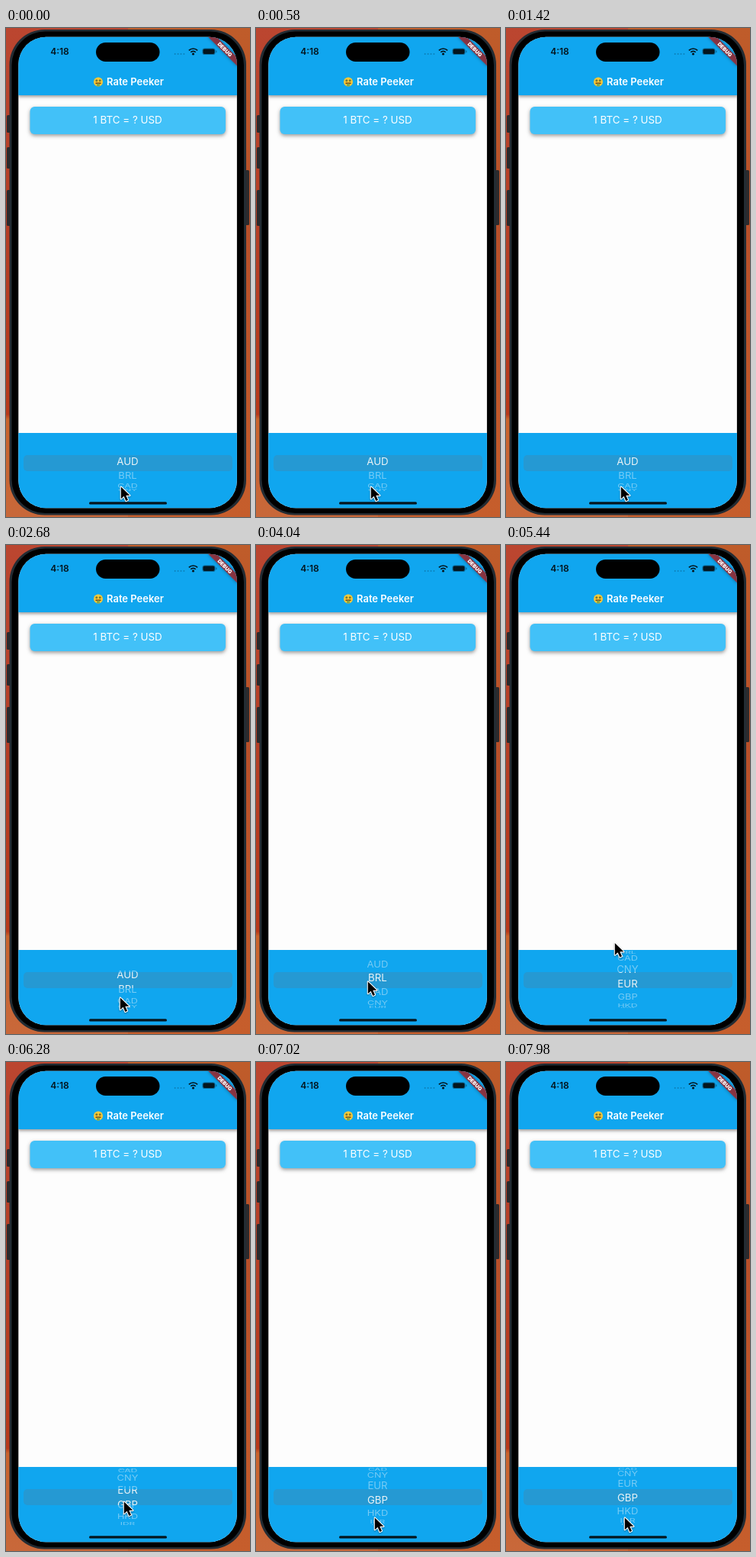
Animation, 320 px wide and 640 px high, one loop 8000 ms. Source, as an HTML page with a canvas:

```html
<!DOCTYPE html>
<html lang="en">
<head>
<meta charset="utf-8">
<title>Currency picker</title>
<style>
html, body { margin: 0; width: 100%; height: 100%; overflow: hidden; background: #000; }
canvas { display: block; width: 320px; height: 640px; }
</style>
</head>
<body>
<canvas id="stage"></canvas>
<script>
const canvas = document.getElementById('stage');
const ctx = canvas.getContext('2d');
const ratio = window.devicePixelRatio || 1;
canvas.width = 320 * ratio;
canvas.height = 640 * ratio;

const LOOP = 8000;
const BLUE = '#10a6ef';
const INK = '#04161f';
const FONT = 'Inter, Roboto, sans-serif';
const CODES = ['AUD', 'BRL', 'CAD', 'CNY', 'EUR', 'GBP', 'HKD', 'IDR', 'ILS', 'INR'];

// After the release the wheel slows down by friction and comes to rest on row 5.
const RELEASE = 110;
const fling = step => 5 - 1.78 * Math.exp(-0.0435 * (step - RELEASE));

// step, wheel position in rows
const DRAG = [[0, 0], [46, 0], [58, 0.265], [86, 1.05], [RELEASE, fling(RELEASE)], [116, fling(116)]];
// step, x, y
const POINTER = [
  [0, 150, 599], [44, 150, 599], [58, 149, 591], [86, 146, 570], [RELEASE, 142.5, 526],
  [116, 142, 519.5], [134, 154, 574], [150, 155, 595], [171, 155, 595]
];

// Steps are equally far apart in the motion but last 20, 100 and 20 ms.
function stepAt(ms) {
  const phase = ms % 140;
  return 3 * Math.floor(ms / 140) + (phase < 20 ? 0 : phase < 120 ? 1 : 2);
}

// Monotone cubic interpolation of one column of the keys.
function track(keys, col, step) {
  const last = keys.length - 1;
  const secant = i => (keys[i + 1][col] - keys[i][col]) / (keys[i + 1][0] - keys[i][0]);
  const slope = i => {
    if (i === 0 || i === last) return 0;
    const a = secant(i - 1), b = secant(i);
    return a * b > 0 ? 2 * a * b / (a + b) : 0;
  };
  let i = 0;
  while (i < last - 1 && step >= keys[i + 1][0]) i++;
  const h = keys[i + 1][0] - keys[i][0];
  const u = Math.min(1, (step - keys[i][0]) / h), v = 1 - u;
  return keys[i][col] * (1 + 2 * u) * v * v + keys[i + 1][col] * u * u * (3 - 2 * u)
    + h * u * v * (slope(i) * v - slope(i + 1) * u);
}

function roundRect(x, y, w, h, r, color) {
  ctx.beginPath();
  ctx.roundRect(x, y, w, h, r);
  ctx.fillStyle = color;
  ctx.fill();
}

function dot(x, y, r, color) {
  ctx.beginPath();
  ctx.arc(x, y, r, 0, 7);
  ctx.fillStyle = color;
  ctx.fill();
}

function shadow(color, blur, dy) {
  ctx.shadowColor = color;
  ctx.shadowBlur = blur * ratio;
  ctx.shadowOffsetY = dy * ratio;
}

function label(text, x, baseline, size, weight, color, align = 'center') {
  ctx.font = `${weight} ${size}px ${FONT}`;
  ctx.textAlign = align;
  ctx.fillStyle = color;
  ctx.fillText(text, x, baseline);
}

function wallpaper(x, stops) {
  const paint = ctx.createLinearGradient(0, 0, 0, 640);
  stops.forEach(([at, color]) => paint.addColorStop(at, color));
  ctx.fillStyle = paint;
  ctx.fillRect(x, 0, 160, 640);
}

function drawPhone() {
  wallpaper(0, [[0, '#bb4630'], [0.4, '#b53f26'], [0.79, '#b8391a'], [0.8, '#c9632c'], [1, '#c8683a']]);
  wallpaper(160, [[0, '#bf5c2a'], [0.4, '#b8502a'], [1, '#c65e2c']]);

  [[1, 114, 23], [1, 156, 28], [1, 212, 47], [314, 186, 72]]
    .forEach(([x, y, h]) => roundRect(x, y, 5, h, 1.5, '#2c2a2c'));
  roundRect(4.5, 2, 310.5, 635.5, 46, '#232c33');
  roundRect(7.5, 4.5, 304.5, 630.5, 44, '#000');
}

function drawDebugBanner() {
  ctx.save();
  ctx.translate(303, 12);
  ctx.rotate(Math.PI / 4);
  shadow('rgba(0,0,0,.5)', 4, 0);
  ctx.fillStyle = 'rgba(183,28,28,.72)';
  ctx.fillRect(-27, 18.6, 54, 8);
  shadow('transparent', 0, 0);
  label('DEBUG', 0, 25.1, 6.8, 900, '#fff');
  ctx.restore();
}

function drawStatusBar() {
  label('4:18', 70.5, 35.3, 12, 600, INK);
  roundRect(118, 19, 83.5, 25, 12.5, '#000');
  for (let i = 0; i < 4; i++) dot(221.7 + i * 3.9, 34, 1, '#0b7fb8');
  ctx.strokeStyle = INK;
  ctx.lineWidth = 1.7;
  [4.6, 8].forEach(r => {
    ctx.beginPath();
    ctx.arc(245.5, 35, r, -Math.PI * 0.75, -Math.PI * 0.25);
    ctx.stroke();
  });
  dot(245.5, 34, 1.6, INK);
  roundRect(257.5, 26.5, 17, 8.5, 2.8, '#0a6b9c');
  roundRect(258.5, 27.5, 15, 6.5, 2, INK);
  roundRect(275.2, 29.3, 1.3, 3, 0.6, '#0a6b9c');
}

function drawMoneyFace() {
  dot(121, 70.5, 6, '#f8c93a');
  dot(118.8, 68.7, 1.5, '#7c7a2c');
  dot(123.2, 68.7, 1.5, '#7c7a2c');
  roundRect(117.3, 71.5, 7.4, 1.6, 0.8, '#7a3c10');
  roundRect(119, 72.5, 4, 4, 1, '#8aa648');
}

function drawScreen() {
  ctx.fillStyle = '#fdfdfd';
  ctx.fillRect(16, 11, 288, 618);
  shadow('rgba(0,0,0,.4)', 4, 1.5);
  ctx.fillStyle = BLUE;
  ctx.fillRect(16, 11, 288, 77);
  shadow('rgba(0,0,0,.4)', 5, 2);
  roundRect(31.5, 103, 256.5, 36, 6, '#42c1f8');
  shadow('transparent', 0, 0);

  drawStatusBar();
  drawMoneyFace();
  label('Rate Peeker', 132, 74.8, 13, 600, '#fff', 'left');
  label('1 BTC = ? USD', 159.5, 125.4, 13.4, 400, '#fff');

  ctx.fillStyle = BLUE;
  ctx.fillRect(16, 530, 288, 99);
  roundRect(23, 559, 274, 21, 5, '#2599d3');
}

// Rows lie on a cylinder seen with a weak perspective.
function drawRows(position, top, height, color) {
  const radius = 42.8, rowAngle = 0.443, middle = 569.6;
  ctx.save();
  ctx.beginPath();
  ctx.rect(17, top, 286, height);
  ctx.clip();
  CODES.forEach((code, i) => {
    const angle = (i - position) * rowAngle;
    if (Math.abs(angle) > Math.PI / 2) return;
    const depth = 1 + 0.003 * 64.3 * (1 - Math.cos(angle));
    ctx.save();
    ctx.translate(159.5, middle + radius * Math.sin(angle) / depth);
    ctx.scale(1 / depth, Math.cos(angle) / depth);
    label(code, 0, 2.6, 13.3, 400, color);
    ctx.restore();
  });
  ctx.restore();
}

function drawPointer(x, y) {
  ctx.save();
  ctx.translate(x, y);
  shadow('rgba(0,0,0,.35)', 2, 1);
  ctx.lineJoin = 'round';
  ctx.lineWidth = 2.2;
  ctx.strokeStyle = '#fff';
  ctx.fillStyle = '#000';
  const arrow = new Path2D('M.8 1.5V17.2L4.6 13.8 7.4 20 10 18.8 7.3 12.8H12.4Z');
  ctx.stroke(arrow);
  shadow('transparent', 0, 0);
  ctx.fill(arrow);
  ctx.restore();
}

function draw(ms) {
  const step = stepAt(ms);
  const position = step < RELEASE ? track(DRAG, 1, step) : fling(step);
  ctx.setTransform(ratio, 0, 0, ratio, 0, 0);
  drawPhone();

  ctx.save();
  ctx.beginPath();
  ctx.roundRect(16.3, 11.7, 286.6, 616.6, 36);
  ctx.clip();
  drawScreen();
  drawRows(position, 530, 29, '#78cbf4');
  drawRows(position, 559, 21, '#eaf3f6');
  drawRows(position, 580, 29, '#78cbf4');
  roundRect(109, 620.3, 102, 3.2, 1.6, INK);
  drawDebugBanner();
  ctx.restore();

  drawPointer(track(POINTER, 1, step), track(POINTER, 2, step));
}

function tick() {
  draw(performance.now() % LOOP);
  requestAnimationFrame(tick);
}
tick();
</script>
</body>
</html>
```
